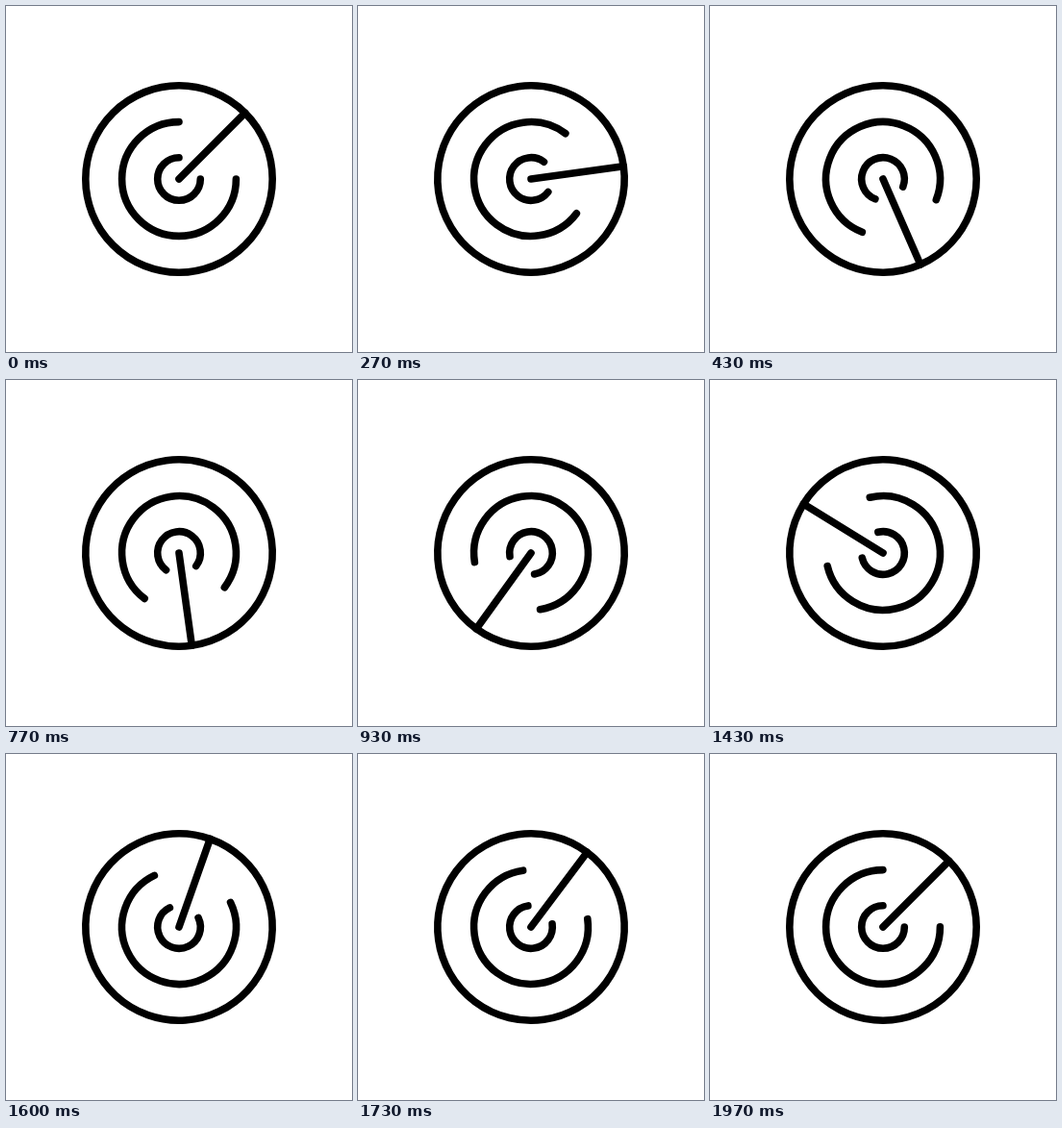
Animation, 360 px wide and 360 px high, one loop 2 s. Source, as an HTML page:

```html
<!DOCTYPE html>
<html lang="en">
<head>
<meta charset="utf-8">
<title>Radar</title>
<style>
  html, body { margin: 0; width: 100%; height: 100%; overflow: hidden; background: #fff; }
  svg { display: block; width: 100%; height: 100%; }
</style>
</head>
<body>
<svg viewBox="0 0 360 360">
  <g id="radar" fill="none" stroke="#000" stroke-width="7.6" stroke-linecap="round">
    <circle cx="180" cy="180" r="97.2"/>
    <path d="M180 120.6A59.4 59.4 0 1 0 239.4 180"/>
    <path d="M180 157.7A22.3 22.3 0 1 0 202.3 180"/>
    <path d="M180 180L248.7 111.3"/>
  </g>
</svg>
<script>
const LOOP = 2000;
const FRAMES = 60;
const SWEEP = 120;
const radar = document.getElementById("radar");

// Each sweep: start and end in frames, then the two horizontal easing handles.
const sweeps = [
  { from: 0, to: 18, out: 0.744, into: 0.255 },
  { from: 18, to: 37.5, out: 0.718, into: 0.387 },
  { from: 37.5, to: 60, out: 0.55, into: 0.04 }
];

// Cubic easing with flat ends; solves x(s) = t by bisection.
function ease(t, x1, x2) {
  let low = 0, high = 1;
  for (let i = 0; i < 24; i++) {
    const s = (low + high) / 2, r = 1 - s;
    const x = 3 * r * r * s * x1 + 3 * r * s * s * x2 + s * s * s;
    if (x < t) low = s; else high = s;
  }
  return low * low * (3 - 2 * low);
}

function angleAt(frame) {
  const index = sweeps.findIndex(sweep => frame < sweep.to);
  const { from, to, out, into } = sweeps[index];
  return SWEEP * (index + ease((frame - from) / (to - from), out, into));
}

function draw(time) {
  // Frame starts are rounded to 10 ms, hence the half-step of 5.
  const frame = Math.min(FRAMES - 1, Math.floor((time % LOOP + 5) * FRAMES / LOOP));
  radar.setAttribute("transform", `rotate(${angleAt(frame).toFixed(3)} 180 180)`);
}

function tick() {
  draw(performance.now());
  requestAnimationFrame(tick);
}
tick();
</script>
</body>
</html>
```
